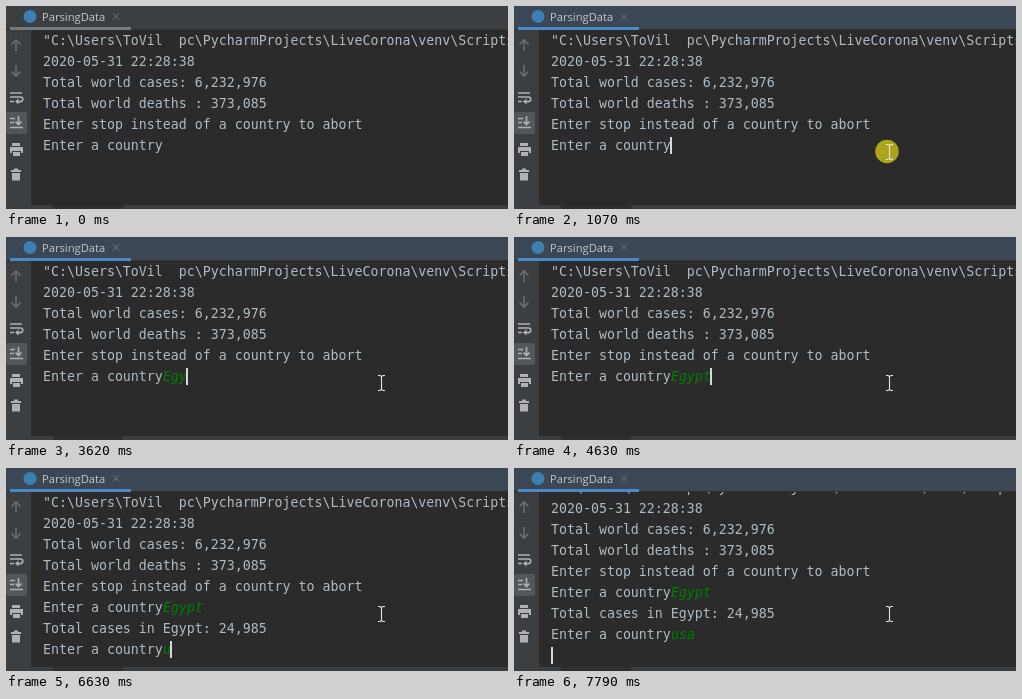
An HTML page that plays this animation: 502x203 px, repeating every 8 s.

```html
<!DOCTYPE html>
<html lang="en">
<head>
<meta charset="utf-8">
<title>Console session</title>
<style>
  html, body { margin: 0; width: 502px; height: 203px; overflow: hidden; background: #2b2b2b; }
  svg { display: block; }
  .console text { font: 13.288px "DejaVu Sans Mono", "Noto Sans Mono", monospace; fill: #adbbc5; white-space: pre; }
  .console .input { fill: #007f00; font-style: italic; }
  .tab { font: 11.2px "Open Sans", "Noto Sans", sans-serif; fill: #c4c6c8; }
  .icon { fill: none; stroke: #afb1b3; stroke-width: 1.6; }
  .icon .solid { fill: #afb1b3; stroke: none; }
  .icon .dim { stroke: #6b6e70; }
</style>
</head>
<body>
<svg width="502" height="203" viewBox="0 0 502 203">
  <defs>
    <clipPath id="view"><rect x="25" y="24" width="477" height="175"/></clipPath>
  </defs>
  <rect width="502" height="203" fill="#2b2b2b"/>

  <g class="console" clip-path="url(#view)"><g id="lines"></g></g>
  <rect id="caret" width="2" height="17" fill="#d8d8d8"/>

  <rect y="23" width="25" height="180" fill="#3c3f41"/>
  <rect y="199" width="502" height="4" fill="#3c3f41"/>
  <rect x="47" y="199" width="70" height="4" fill="#2d2f30"/>

  <rect id="header" width="502" height="23"/>
  <rect y="23" width="502" height="1" fill="#323232"/>
  <rect id="underline" x="4" y="21" width="121" height="3"/>
  <circle cx="24" cy="10.5" r="6.5" fill="#3d7fb1"/>
  <text class="tab" x="36" y="15">ParsingData</text>
  <path d="M107 7.5l6 6m0-6l-6 6" stroke="#76797b" fill="none"/>

  <rect x="0" y="106" width="21" height="22" rx="2" fill="#53575a"/>
  <g class="icon">
    <path class="dim" d="M10 45V34M5.5 38.5L10 34l4.5 4.5"/>
    <path class="dim" d="M10 59V70M5.500 65.500L10 70l4.500-4.500"/>
    <path d="M4 87H16M4 91H14.500a2.300 2.300 0 0 1 0 4.600H11M4 95.500H8"/>
    <path class="solid" d="M12.500 92.500V98.500L9 95.500Z"/>
    <path d="M4 112.500H9M4 116.500H8M4 121.500H17M12.500 110V118M9.500 115.500l3 3l3-3"/>
    <path class="solid" d="M6 137H14V140H6ZM4 141H17V147H15V145H6V147H4ZM7 146H14V150H7Z"/>
    <path class="solid" d="M5 164H15V166H5ZM8 162.500H12V164H8ZM6 167H14V174.500H6Z"/>
  </g>

  <circle id="click" cx="373" cy="145.500" r="11.800" fill="#aca51c"/>
  <path id="pointer" d="M-3.500-7.500H-1.500L0-6.500L1.500-7.500H3.500M0-6.500V6.500M-3.500 7.500H-1.500L0 6.500L1.500 7.500H3.500" fill="none" stroke="#e4e4e4" stroke-width="1.1"/>
</svg>
<script>
const LOOP = 8000, LEFT = 37, CELL = 8, ROW = 21, BASE = 39;
const PROMPT = "Enter a country";
const byId = id => document.getElementById(id);
const [header, underline, caret, click, pointer, lines] =
  ["header", "underline", "caret", "click", "pointer", "lines"].map(byId);

function addText(row, column, content, input = false) {
  const el = document.createElementNS("http://www.w3.org/2000/svg", "text");
  el.setAttribute("x", LEFT + column * CELL);
  el.setAttribute("y", BASE + row * ROW);
  if (input) el.setAttribute("class", "input");
  el.textContent = content;
  lines.append(el);
  return el;
}

[
  '"C:\\Users\\ToVil  pc\\PycharmProjects\\LiveCorona\\venv\\Scripts',
  "2020-05-31 22:28:38",
  "Total world cases: 6,232,976",
  "Total world deaths : 373,085",
  "Enter stop instead of a country to abort",
  PROMPT
].forEach((line, row) => addText(row, 0, line));

const reply = [addText(6, 0, "Total cases in Egypt: 24,985"), addText(7, 0, PROMPT)];
const entries = [
  { word: "Egypt", keys: [2990, 3450, 3620, 4230, 4630], el: addText(5, PROMPT.length, "", true) },
  { word: "usa", keys: [6630, 6800, 7030], el: addText(7, PROMPT.length, "", true) }
];
const ENTER_AT = 5380, REPLY_AT = 5620, SCROLL_AT = 7790;

// Pointer stops: time, x, y
const stops = [
  [70, 396.5, 201], [140, 396, 190], [210, 395, 180], [280, 394, 172], [350, 393.5, 168],
  [670, 387, 160], [750, 380, 151], [820, 375.5, 146]
];
// Spans in which the caret is visible
const caretOn = [[990, 1540], [2070, 2530], [2990, 5150], [5380, 6100], [6630, 7640], [7790, LOOP]];

const within = (t, from, to) => t >= from && t < to;
const show = (el, visible) => el.setAttribute("visibility", visible ? "visible" : "hidden");

function caretCell(t, typed) {
  if (t >= SCROLL_AT) return [8, 0];
  if (t >= REPLY_AT) return [7, PROMPT.length + typed[1]];
  if (t >= ENTER_AT) return [6, 0];
  return [5, PROMPT.length + typed[0]];
}

function render(t) {
  const focused = t >= 1070;
  header.setAttribute("fill", focused ? "#3b4754" : "#3c3f41");
  underline.setAttribute("fill", focused ? "#4a88c7" : "#747a80");

  const typed = entries.map(({ word, keys, el }) => {
    const count = keys.filter(key => t >= key).length;
    el.textContent = word.slice(0, count);
    return count;
  });
  reply.forEach(el => show(el, t >= REPLY_AT));

  const scroll = t >= SCROLL_AT ? 15 : 0;
  lines.setAttribute("transform", `translate(0 ${-scroll})`);

  const [row, column] = caretCell(t, typed);
  caret.setAttribute("x", LEFT + column * CELL - (column ? 1 : 0));
  caret.setAttribute("y", BASE - 13 + row * ROW - scroll);
  show(caret, caretOn.some(([from, to]) => within(t, from, to)));

  const stop = stops.filter(([time]) => t >= time).pop();
  show(pointer, Boolean(stop));
  if (stop) pointer.setAttribute("transform", `translate(${stop[1]} ${stop[2]})`);
  show(click, within(t, 990, 1140));
}

const start = performance.now();
function tick() {
  render((performance.now() - start) % LOOP);
  requestAnimationFrame(tick);
}
render(0);
requestAnimationFrame(tick);
</script>
</body>
</html>
```
